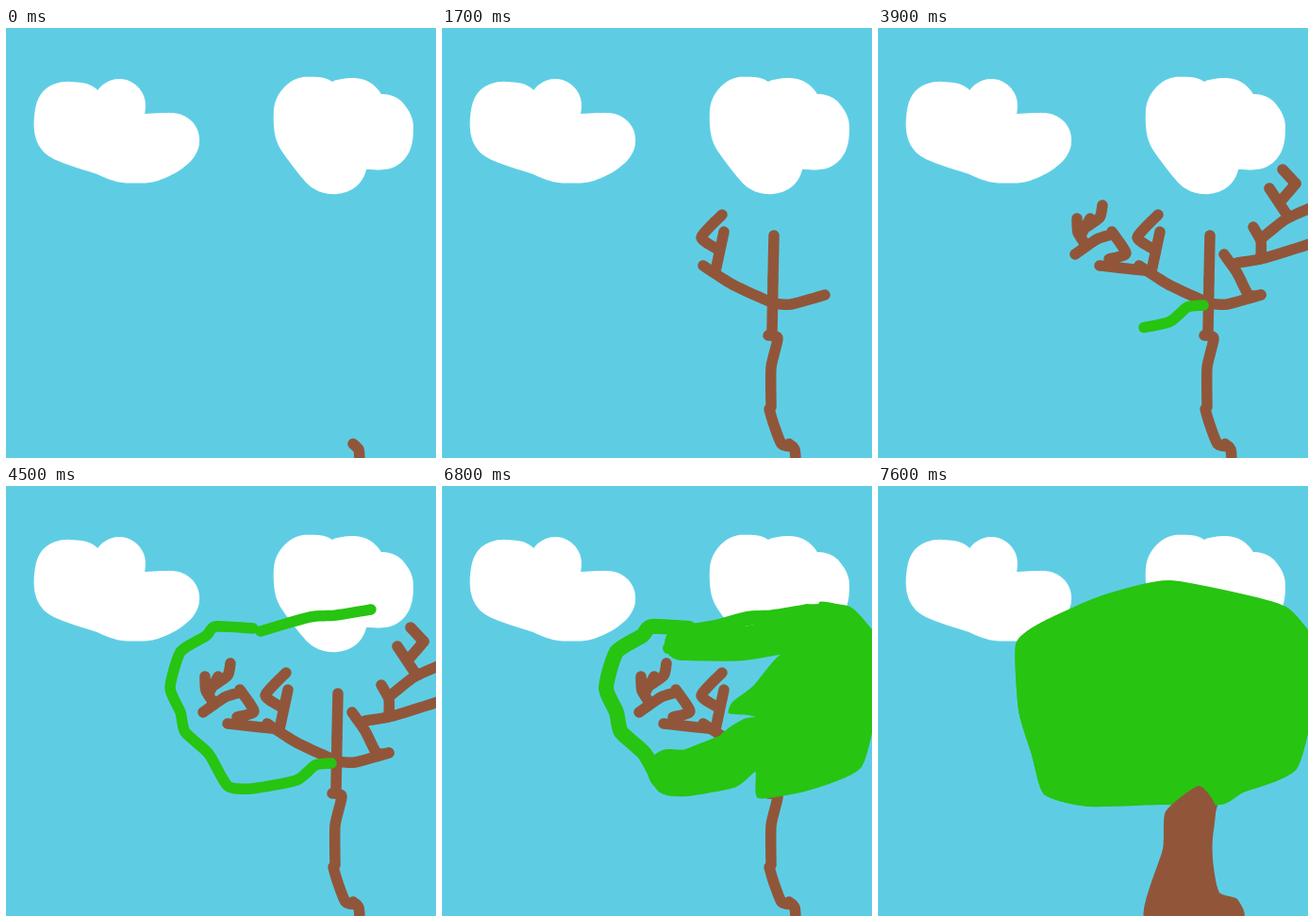
An HTML page with a canvas for the animation above (7.7 s loop, 456 px wide and 456 px high).

```html
<!DOCTYPE html>
<html lang="en">
<head>
<meta charset="utf-8">
<title>Painting a tree</title>
<style>
html, body { margin: 0; width: 100%; height: 100%; overflow: hidden; background: #5ecde4; }
canvas { display: block; width: 456px; height: 456px; }
</style>
</head>
<body>
<canvas id="stage" width="456" height="456"></canvas>
<script>
const SIZE = 456, LOOP = 7700, STEP = 100;
const SKY = '#5ecde4', WHITE = '#fff', BROWN = '#91563a', GREEN = '#27c411';
const THIN = 11.5, CLOUD = 56;
const ctx = document.getElementById('stage').getContext('2d');

// Smooth curve through a few key points given as x, y pairs.
function curve(keys, closed = false) {
  const n = keys.length / 2, samples = 8, points = [];
  const key = i => {
    const k = closed ? (i + n) % n : Math.max(0, Math.min(n - 1, i));
    return [keys[2 * k], keys[2 * k + 1]];
  };
  for (let i = 0; i < (closed ? n : n - 1); i++) {
    const [before, a, b, after] = [key(i - 1), key(i), key(i + 1), key(i + 2)];
    for (let s = 0; s < samples; s++) {
      const u = s / samples, ease = u * u * (3 - 2 * u);
      const leave = 0.3 * u * (1 - u) ** 2, arrive = 0.3 * u * u * (u - 1);
      points.push([0, 1].map(d => a[d] + (b[d] - a[d]) * ease
        + (b[d] - before[d]) * leave + (after[d] - a[d]) * arrive));
    }
  }
  points.push(key(closed ? 0 : n - 1));
  return points;
}

const ellipse = (x, y, rx, ry) => Array.from({ length: 48 }, (_, i) => {
  const angle = i * Math.PI / 24;
  return [x + rx * Math.cos(angle), y + ry * Math.sin(angle)];
});

const shrink = (points, x, y, scale) =>
  points.map(p => [x + (p[0] - x) * scale, y + (p[1] - y) * scale]);

// Brush lines grow over `steps`; fills appear at once, overlaps cut holes.
const brush = (start, steps, color, width, ...lines) =>
  ({ start, steps, color, width, lines: lines.map(keys => curve(keys)) });
const fill = (start, color, ...shapes) => ({ start, color, shapes });

const crown = curve([146,168, 170,147, 235,118, 310,101, 427,126, 456,157, 464,215, 444,300,
  388,324, 365,337, 300,337, 220,339, 176,327, 163,285, 149,238], true);
const rim = [345,294, 328,296, 308,312, 260,321, 235,318, 215,284, 190,261, 185,240, 174,214,
  185,176, 212,159, 222,149, 262,151];

const layers = [
  brush(0, 1, WHITE, CLOUD,
    [78,86, 60,86, 60,112, 104,128, 125,136, 150,136, 168,128, 176,118, 120,118, 120,82],
    [330,80, 318,80, 312,88, 314,112, 340,146, 354,146, 360,122, 400,122, 404,105, 400,98],
    [358,82, 372,82, 385,105]),

  // Trunk
  brush(0, 1, BROWN, THIN, [368,441, 374,447, 375,458]),
  brush(400, 5, BROWN, THIN,
    [372,444, 360,441, 351,418, 347,404],
    [349,402, 349,360, 356,329, 346,326],
    [350,322, 351,267]),
  brush(1200, 1, BROWN, THIN, [351,267, 352,220]),

  // Branches
  brush(1300, 5, BROWN, THIN,
    [406,283, 370,293, 350,291, 308,272, 277,252],
    [290,258, 299,216],
    [293,235, 275,222, 297,198]),
  brush(1900, 6, BROWN, THIN,
    [406,283, 393,283, 381,260, 367,240],
    [381,249, 410,244, 458,229],
    [406,244, 406,226, 398,211],
    [408,222, 432,203, 458,191],
    [435,200, 415,170],
    [426,185, 443,165]),
  brush(3200, 4, BROWN, THIN,
    [443,165, 429,150],
    [290,258, 235,252],
    [245,245, 263,239, 248,216],
    [248,219, 232,224, 209,240],
    [211,202, 212,217, 221,231],
    [225,202, 216,218],
    [238,188, 235,201, 218,213]),

  // Leaves
  brush(3900, 7, GREEN, THIN, rim, [270,154, 322,139, 350,137, 387,131]),
  brush(4600, 1, GREEN, THIN, [387,131, 430,133, 458,164]),
  fill(4700, GREEN, curve([400,123, 436,131, 456,157, 464,215, 445,298, 388,323, 335,331, 332,301,
    308,312, 293,268, 320,247, 350,242, 363,222, 385,192, 404,157], true)),
  brush(4800, 1, GREEN, 16, rim),
  brush(4800, 1, GREEN, 46, [241,302, 262,302, 306,285]),
  brush(4800, 1, GREEN, 12, [265,152, 345,139], [309,174, 330,163, 360,153]),
  brush(4800, 1, GREEN, 26, [346,146, 400,142]),
  brush(6800, 1, GREEN, 36, [254,167, 320,167, 400,152]),
  fill(6800, GREEN, curve([400,150, 356,181, 330,212, 308,229, 304,241, 325,243, 350,248,
    400,240], true)),
  brush(6800, 1, GREEN, 12, [240,172, 250,155]),
  { start: 6900, steps: 2, color: GREEN, width: THIN, lines: [shrink(crown, 305, 220, 0.96)] },
  fill(7000, GREEN, crown, ellipse(234, 228, 84, 72)),
  fill(7400, GREEN, crown),
  fill(7600, BROWN, curve([283,460, 302,385, 305,345, 340,318, 358,340, 354,385, 361,430, 381,438,
    385,460], true))
];

const distance = (a, b) => Math.hypot(b[0] - a[0], b[1] - a[1]);
const lengthOf = line => line.slice(1).reduce((sum, p, i) => sum + distance(line[i], p), 0);

function trace(line, limit = Infinity) {
  ctx.moveTo(...line[0]);
  for (let i = 1; i < line.length && limit > 0; i++) {
    const [a, b] = [line[i - 1], line[i]];
    const length = distance(a, b), part = length > limit ? limit / length : 1;
    ctx.lineTo(a[0] + (b[0] - a[0]) * part, a[1] + (b[1] - a[1]) * part);
    limit -= length;
  }
}

function paintBrush({ start, steps, color, width, lines }, time) {
  const progress = (Math.floor((time - start) / STEP) + 1) / steps;
  let left = progress < 1 ? progress * lines.reduce((sum, p) => sum + lengthOf(p), 0) : Infinity;
  ctx.strokeStyle = color;
  ctx.lineWidth = width;
  ctx.beginPath();
  for (const line of lines) {
    if (left <= 0) break;
    trace(line, left);
    left -= lengthOf(line);
  }
  ctx.stroke();
}

function paintFill({ color, shapes }) {
  ctx.fillStyle = color;
  ctx.beginPath();
  for (const shape of shapes) {
    trace(shape);
    ctx.closePath();
  }
  ctx.fill('evenodd');
}

function draw(time) {
  ctx.fillStyle = SKY;
  ctx.fillRect(0, 0, SIZE, SIZE);
  ctx.lineCap = ctx.lineJoin = 'round';
  for (const layer of layers) {
    if (time < layer.start) continue;
    if (layer.lines) paintBrush(layer, time);
    else paintFill(layer);
  }
}

const begin = performance.now();
function tick() {
  draw((performance.now() - begin) % LOOP);
  requestAnimationFrame(tick);
}
tick();
</script>
</body>
</html>
```
